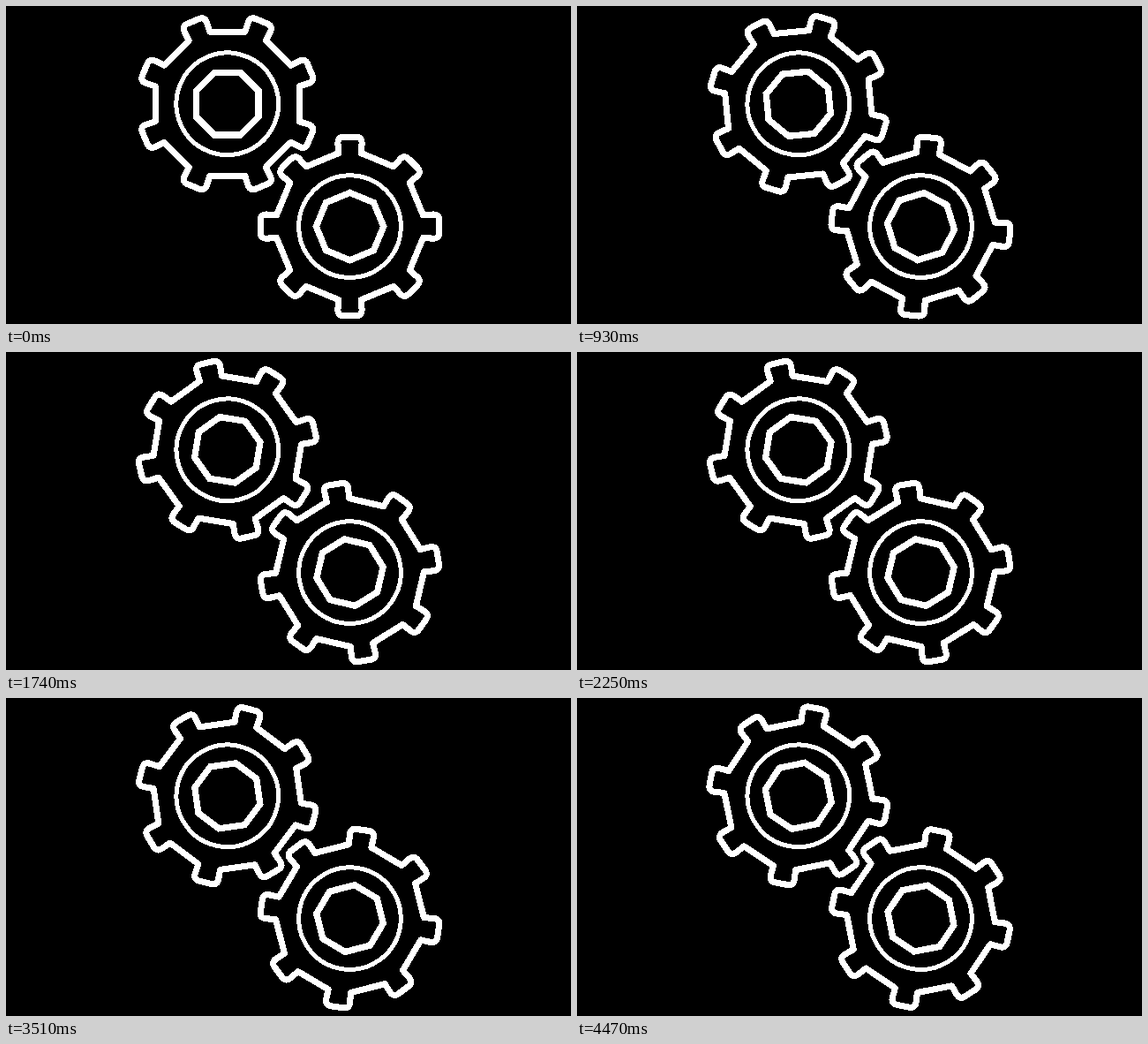
Animation of 640 by 360 pixels, one loop 4500 ms. Source, as an HTML page:

```html
<!DOCTYPE html>
<html lang="en">
<head>
<meta charset="utf-8">
<title>Meshing gears</title>
<style>
  html, body { margin: 0; height: 100%; overflow: hidden; background: #000; }
  svg { display: block; width: 100vw; height: 100vh; }
</style>
</head>
<body>
<svg viewBox="0 0 640 360" fill="none" stroke="#fff" shape-rendering="crispEdges">
  <defs>
    <g id="gear">
      <path id="rim" stroke-width="7.1" stroke-linejoin="round"/>
      <circle r="57.8" stroke-width="5"/>
      <path id="hub" stroke-width="7.3"/>
    </g>
  </defs>
  <use id="upper" href="#gear"/>
  <use id="lower" href="#gear"/>
</svg>
<script>
const LOOP = 4500, STEP = 30, TEETH = 8, PITCH = 360 / TEETH;
const $ = id => document.getElementById(id);

// Point (x, y) turned clockwise by a number of teeth
const turned = (x, y, teeth) => {
  const a = teeth * 2 * Math.PI / TEETH, c = Math.cos(a), s = Math.sin(a);
  return `${(x * c - y * s).toFixed(2)},${(x * s + y * c).toFixed(2)}`;
};

let rim = '', hub = '';
for (let i = 0; i < TEETH; i++) {
  const p = (x, y) => turned(x, y, i);
  rim += `${i ? 'L' : 'M'}${p(-12.8, -83)}L${p(-13.6, -94)}Q${p(-14, -101.2)} ${p(-7, -101.2)}`
       + `L${p(7, -101.2)}Q${p(14, -101.2)} ${p(13.6, -94)}L${p(12.8, -83)}`;
  hub += `${i ? 'L' : 'M'}${p(0, -38.2)}`;
}
$('rim').setAttribute('d', rim + 'Z');
$('hub').setAttribute('d', hub + 'Z');

// Nearly steady turning with short stalls: [ms, degrees]
const turn = [[0, 0], [570, 63], [1290, 128.2], [2160, 210.3], [2190, 210.3], [2250, 215.8],
  [2670, 253.6], [2760, 253.6], [3090, 283.4], [3900, 360], [LOOP, 419.5]];

function angleAt(t) {
  const i = turn.findIndex(([ms]) => ms > t);
  const [t0, a0] = turn[i - 1], [t1, a1] = turn[i];
  return a0 + (a1 - a0) * (t - t0) / (t1 - t0);
}

function draw(now) {
  const t = Math.floor(now % LOOP / STEP) * STEP;
  const angle = angleAt(t);
  $('upper').setAttribute('transform', `translate(250.8 110.8) rotate(${PITCH / 2 - angle})`);
  $('lower').setAttribute('transform', `translate(389.5 249.6) rotate(${angle})`);
}

const start = performance.now();
function tick() {
  draw(performance.now() - start);
  requestAnimationFrame(tick);
}
tick();
</script>
</body>
</html>
```
